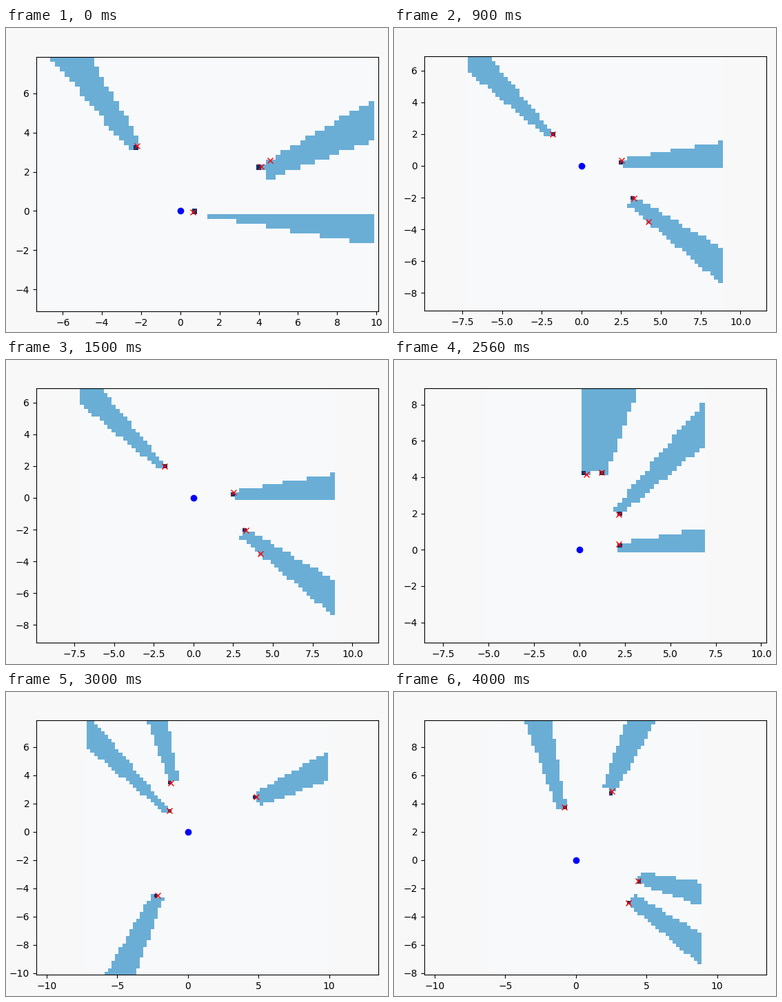
Animation, 554 px wide and 441 px high, one loop 4.9 s. Source, as a matplotlib script:

```python
import math

import matplotlib.pyplot as plt
import numpy as np
from matplotlib.animation import FuncAnimation
from matplotlib.colors import ListedColormap

W, H, DPI = 554, 441, 100
LEFT, TOP = 36, 16          # part of the 640 px wide window that is cut away
CELL = 0.25
SECTOR = math.radians(10)
MARGIN = 5
STEP_MS = 100
LOOP_MS = 4900

PAPER = "#f8f8f8"
CMAP = ListedColormap(["#f8f9fa", "#6aaed6", "#08306b"])  # free, hidden, hit

# start time: obstacles as x + yj; everything else is ray cast from them
SCANS = {
    0: [0.64 - 0.05j, -2.22 + 3.34j, 4.58 + 2.59j, 4.12 + 2.28j],
    900: [4.21 - 3.53j, -1.82 + 1.98j, 2.54 + 0.34j, 3.3 - 2.05j],
    1900: [0.37 + 4.15j, 1.22 + 4.26j, 2.17 + 1.94j, 2.17 + 0.31j],
    3000: [-1.19 + 3.45j, -1.3 + 1.49j, 4.84 + 2.47j, -2.14 - 4.51j],
    4000: [-0.82 + 3.75j, 2.55 + 4.86j, 4.4 - 1.48j, 3.72 - 3.03j],
}


def sector(z):
    return np.floor(np.mod(np.angle(z), 2 * math.pi) / SECTOR)


def span(values):
    return round(min(values) - MARGIN), round(max(values) + MARGIN)


def ray_cast(points):
    """Cell edges and occupancy as seen from the origin."""
    (x0, x1), (y0, y1) = span(points.real), span(points.imag)
    xs, ys = np.arange(x0, x1, CELL), np.arange(y0, y1, CELL)
    cells = xs + 1j * ys[:, None]
    grid = np.zeros(cells.shape)
    for p in points:
        hidden = (sector(cells) == sector(p)) & (abs(cells) > abs(p))
        grid[hidden] = 0.5
        grid[round((p.imag - y0) / CELL), round((p.real - x0) / CELL)] = 1
    half = CELL / 2
    return np.append(xs, x1) - half, np.append(ys, y1) - half, grid


def fit(ax, height):
    """Default subplot box of a 640 px wide window, seen through the crop."""
    bottom = H + TOP - 0.89 * height
    ax.set_position([(80 - LEFT) / W, bottom / H, 496 / W, 0.77 * height / H])


def make_view(points):
    ax = fig.add_axes([0, 0, 1, 1], facecolor=PAPER)
    ax.pcolor(*ray_cast(points), vmin=0, vmax=1, cmap=CMAP)
    ax.axis("equal")
    ax.plot(points.real, points.imag, "xr")
    ax.plot(0, 0, "ob")
    return ax


fig = plt.figure(figsize=(W / DPI, H / DPI), dpi=DPI, facecolor=PAPER)
views = {t: make_view(np.array(points)) for t, points in SCANS.items()}


def update(i):
    t = i * STEP_MS
    current = max(start for start in views if start <= t)
    for start, ax in views.items():
        ax.set_visible(start == current)
    # the window loses one pixel of height right after opening
    fit(views[current], 480 if i == 0 else 479)
    return [views[current]]


anim = FuncAnimation(fig, update, frames=LOOP_MS // STEP_MS,
                     interval=STEP_MS, repeat=True)
plt.show()
```
